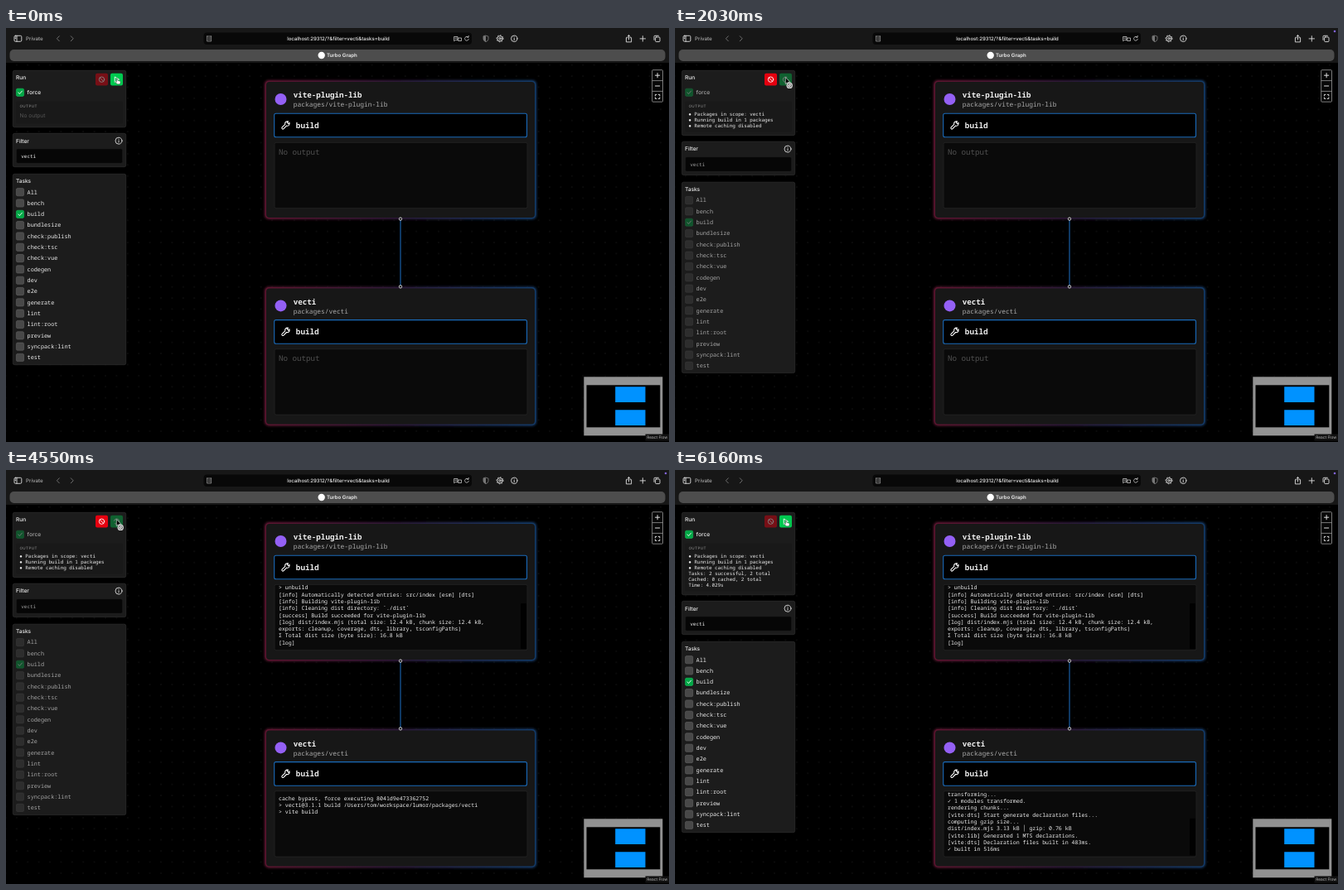
An HTML page for the animation above (6300 ms loop, 800 by 500 pixels).

```html
<!DOCTYPE html>
<html lang="en">
<head>
<meta charset="utf-8">
<title>Turbo Graph</title>
<style>
  html, body { margin: 0; width: 100%; height: 100%; overflow: hidden; background: #000; }
  svg { display: block; width: 800px; height: 500px; }
  text { font-family: Inter, sans-serif; fill: #eee; text-rendering: geometricPrecision; white-space: pre; }
  .mono { font-family: "Noto Sans Mono", "DejaVu Sans Mono", monospace; font-weight: 500; }
  .bold { font-weight: 700; }
  .line { fill: none; stroke: #ddd; stroke-linecap: round; stroke-linejoin: round; }
  .panel { fill: #1c1c1c; stroke: #303030; stroke-width: .7; }
</style>
</head>
<body>
<svg id="stage" viewBox="0 0 800 500" xmlns="http://www.w3.org/2000/svg">
  <defs>
    <pattern id="dots" width="13.4" height="13.4" x="247.3" y="51.3" patternUnits="userSpaceOnUse">
      <circle cx="6.7" cy="6.7" r=".5" fill="#363636"/>
    </pattern>
    <linearGradient id="rim">
      <stop offset="0" stop-color="#5e1530"/>
      <stop offset=".5" stop-color="#2a1936"/>
      <stop offset="1" stop-color="#133c6a"/>
    </linearGradient>
    <filter id="glow" x="-5%" y="-8%" width="110%" height="116%"><feGaussianBlur stdDeviation="1.5"/></filter>
    <clipPath id="view"><rect x="324.5" y="138.8" width="304" height="78.4"/></clipPath>
  </defs>

  <rect width="800" height="500"/>
  <rect y="42" width="800" height="454" fill="url(#dots)"/>

  <!-- browser chrome -->
  <rect width="800" height="42" fill="#171717"/>
  <rect x="238.5" y="5.5" width="323.5" height="14.5" rx="4" fill="#080808"/>
  <rect x="4.5" y="26" width="791" height="14" rx="5" fill="#4d4d4d"/>
  <circle cx="380.7" cy="33" r="4.2" fill="#fff"/>
  <g class="line" stroke-width=".9">
    <rect x="10" y="9.3" width="8.8" height="7" rx="1.4"/><path d="M13 9.3v7M11.2 11h.6M11.2 12.6h.6"/>
    <path d="M64.3 9.8l-2.9 3 2.9 3M78.3 9.8l2.9 3-2.9 3" stroke="#777"/>
    <path d="M242.6 10h5M242.6 10v6h5v-6M244 12h2.4M244 14h2.4" stroke="#aaa" stroke-width=".7"/>
    <path d="M541 10.5h4v4h-2.5l-1.5 1zM546 12h3.5v3.5h-3.5zM542 12.3h2" stroke-width=".7"/>
    <path d="M557.8 11.3a2.4 2.4 0 1 0 .5 2.2M556 10.6l2 .8.2-2" stroke-width=".7"/>
    <path d="M579 9.2l3 1v3.2q0 2-3 3.3q-3-1.3-3-3.3v-3.2z" stroke="#777"/>
    <path d="M579 9.2v7.5q-3-1.3-3-3.3v-3.2z" fill="#777" stroke="none"/>
    <circle cx="596" cy="12.8" r="3.2"/><circle cx="596" cy="12.8" r="1.2"/>
    <circle cx="596" cy="12.8" r="4" stroke-dasharray=".8 2.34"/>
    <circle cx="613.2" cy="12.8" r="3.7"/><path d="M613.2 12.4v2.3M613.2 10.9v.1"/>
    <path d="M750 11.7h-1.6v5.2h6.2v-5.2h-1.6M751.5 14V8.8M749.9 10.3l1.6-1.6 1.6 1.6"/>
    <path d="M768.3 9.7v6.4M765.1 12.9h6.4"/>
    <rect x="783.6" y="11" width="5.4" height="5.6" rx="1"/><path d="M782 14.4v-4.2q0-.9.9-.9h4.4"/>
  </g>
  <circle id="dot" cx="796" cy="4" r="1.3" fill="#8264e0"/>

  <!-- controls -->
  <rect x="779.7" y="50.7" width="12.8" height="38.5" rx="1" fill="#080808" stroke="#999" stroke-width=".8"/>
  <path d="M779.7 63.6h12.8M779.7 76.4h12.8" stroke="#999" stroke-width=".8"/>
  <g class="line" stroke="#fff" stroke-width="1">
    <path d="M783.5 57.2h5.2M786.1 54.6v5.2M783.5 70h5.2"/>
    <path d="M783.4 81.8v-1.4h1.5M787.3 80.4h1.5v1.4M788.8 84v1.4h-1.5M784.9 85.4h-1.5v-1.4"/>
  </g>

  <!-- minimap -->
  <rect x="697.3" y="421.3" width="95" height="71" fill="#929292"/>
  <rect x="700.5" y="431.3" width="88.8" height="51" fill="#000"/>
  <path d="M735.2 433.2h36.3v18.8h-36.3zM735.2 461.2h36.3v18.8h-36.3z" fill="#0092ff"/>
  <rect x="771.5" y="490.5" width="28.5" height="8" fill="#111"/>

  <!-- edge -->
  <path d="M476 231v81" stroke="#195f a6" stroke-width="1.2" style="stroke:#195fa6"/>
  <g id="nodes"></g>
  <g id="side"></g>
</svg>

<script>
const NS = 'http://www.w3.org/2000/svg';
const LOOP = 6300, STEP = 70, CLICK = 840, SCOPE = 1610, DONE = 6090, FADE = 150;
const stage = document.getElementById('stage');
const side = document.getElementById('side');

function el(parent, tag, attrs = {}, text) {
  const e = document.createElementNS(NS, tag);
  for (const k in attrs) e.setAttribute(k, attrs[k]);
  if (text) e.textContent = text;
  parent.appendChild(e);
  return e;
}
// y is the middle of the line
function label(parent, x, y, size, text, attrs = {}) {
  return el(parent, 'text', { x, y: y + size * .34, 'font-size': size, ...attrs }, text);
}
const mono = { class: 'mono' }, bold = { class: 'mono bold' };
const group = parent => el(parent, 'g');
const rect = (parent, x, y, width, height, attrs) => el(parent, 'rect', { x, y, width, height, ...attrs });
const path = (parent, d, attrs) => el(parent, 'path', { d, class: 'line', ...attrs });
const show = (e, on) => e.setAttribute('visibility', on ? 'visible' : 'hidden');
const move = (e, y) => e.setAttribute('transform', `translate(0 ${y})`);

label(stage, 24, 13, 6.2, 'Private', { style: 'fill:#aaa', 'font-weight': 500 });
label(stage, 401, 13, 6.05, 'localhost:29312/?&filter=vecti&tasks=build', { 'text-anchor': 'middle', 'font-weight': 500 });
label(stage, 387, 33, 6.1, 'Turbo Graph', { 'font-weight': 600 });
label(stage, 773.2, 494.5, 4.8, 'React Flow', { style: 'fill:#bbb' });

// Each log entry: [time, lines...]
const libLog = [
  [2450, 'cache bypass, force executing 5ac62673b6de64fb'],
  [2800, '> vite-plugin-lib@3.0.2 build /Users/tom/workspace/lumor/packages/vite-', 'plugin-lib', '> unbuild'],
  [3430, '[info] Automatically detected entries: src/index [esm] [dts]', '[info] Building vite-plugin-lib',
    '[info] Cleaning dist directory: `./dist`'],
  [4060, '[success] Build succeeded for vite-plugin-lib',
    '[log] dist/index.mjs (total size: 12.4 kB, chunk size: 12.4 kB,',
    'exports: cleanup, coverage, dts, library, tsconfigPaths)', 'Σ Total dist size (byte size): 16.8 kB', '[log]']
];
const vectiLog = [
  [4130, 'cache bypass, force executing 8041d9e473362752'],
  [4480, '> vecti@3.1.1 build /Users/tom/workspace/lumor/packages/vecti', '> vite build'],
  [5250, '[vite:lib] Externalized builtin modules.', '[vite:lib] Injected 2 aliases.'],
  [5600, 'vite v7.1.5 building for production...', 'transforming...'],
  [5950, '✓ 1 modules transformed.', 'rendering chunks...', '[vite:dts] Start generate declaration files...'],
  [6020, 'computing gzip size...', 'dist/index.mjs 3.13 kB │ gzip: 0.76 kB',
    '[vite:lib] Generated 1 MTS declarations.', '[vite:dts] Declaration files built in 483ms.', '✓ built in 516ms']
];
const PITCH = 8.3, VIEW = 78;

function makeNode(top, name, log) {
  const g = group(document.getElementById('nodes'));
  move(g, top);
  const rim = { rx: 5, fill: 'url(#rim)' };
  rect(g, 312, 63, 328, 168, { ...rim, filter: 'url(#glow)' });
  rect(g, 312.7, 63.7, 326.6, 166.6, rim);
  rect(g, 314, 65, 324, 164, { rx: 4, fill: '#171717' });
  el(g, 'circle', { cx: 331.5, cy: 86, r: 7, fill: '#9460f5' });
  label(g, 346.8, 81.3, 9.2, name, bold);
  label(g, 346.8, 92.6, 7.9, 'packages/' + name, { ...mono, style: 'fill:#aaa' });
  rect(g, 323.7, 103.2, 304.8, 28.6, { rx: 2, fill: '#000', stroke: '#1a6ab8', 'stroke-width': 1.1 });
  path(g, 'M339.2 114.2l1.5 1.5 1.3-1.3q.5 2-.8 3.2-1.2 1-2.7.5l-3.5 3.6q-.9.8-1.8 0-.8-.9 0-1.8l3.6-3.5q-.5-1.5.5-2.7 1.2-1.3 3.2-.8z',
    { style: 'stroke:#fff', 'stroke-width': 1.1 });
  label(g, 349.8, 117.8, 9.3, 'build', bold);
  rect(g, 324, 138.3, 305, 79.4, { rx: 2, fill: '#0a0a0a', stroke: '#252525', 'stroke-width': .8 });
  const empty = label(g, 329, 149.5, 9.2, 'No output', { ...mono, style: 'fill:#505050' });
  const clip = el(g, 'g', { 'clip-path': 'url(#view)' });
  const body = group(clip);
  const lines = log.flatMap(([at, ...rows]) => rows.map(row => ({ at, row })));
  lines.forEach((l, i) => l.node = label(body, 329, 147.2 + i * PITCH, 6.57, l.row, mono));
  const thumb = rect(clip, 621, 140, 7, 10, { rx: 1, fill: '#010101' });
  return t => {
    const n = lines.filter(l => l.at <= t).length;
    show(empty, !n);
    lines.forEach((l, i) => show(l.node, i < n));
    const full = n * PITCH + 8.4, scroll = Math.max(0, full - VIEW);
    move(body, -scroll);
    show(thumb, scroll > 0);
    thumb.setAttribute('y', 140 + scroll / full * 76);
    thumb.setAttribute('height', Math.min(1, VIEW / full) * 76);
  };
}
const nodes = [makeNode(0, 'vite-plugin-lib', libLog), makeNode(249.4, 'vecti', vectiLog)];
for (const cy of [230.6, 312.4])
  el(stage, 'circle', { cx: 476, cy, r: 1.7, fill: '#111', stroke: '#ddd', 'stroke-width': .9 });

// Parts that dim while a run is active, each with its dimmed opacity
const dims = [];
function dimGroup(parent, low) {
  const g = group(parent);
  dims.push([g, low]);
  return g;
}
function checkbox(parent, y, on) {
  rect(parent, 12.4, y - 4.6, 9.2, 9.2, { rx: 1.6, fill: on ? '#00a846' : '#484848', stroke: on ? '#16c25c' : '#626262', 'stroke-width': .6 });
  if (on) path(parent, `M14.8 ${y + .1}l1.6 1.7 3-3.5`, { style: 'stroke:#fff', 'stroke-width': .9 });
}
const BOX = .4, TEXT = .65;

// Run panel
const white = { style: 'stroke:#fff', 'stroke-width': .9 };
const runBox = rect(side, 8.3, 51.3, 136.4, 68.5, { rx: 2, class: 'panel' });
label(side, 12, 60, 6.6, 'Run', { 'font-weight': 500 });
const stop = group(side);
rect(stop, 108, 54.8, 15, 14.8, { rx: 2, fill: '#e5000f' });
el(stop, 'circle', { cx: 115.5, cy: 62.2, r: 3.2, class: 'line', ...white });
path(stop, 'M113.2 60l4.6 4.5', white);
const start = dimGroup(side, BOX);
rect(start, 126, 54.8, 15, 14.8, { rx: 2, fill: '#00c950' });
const play = path(start, 'M131.6 59.2l5 3-5 3z', white);
const spinner = path(start, 'M136.7 62.2a3.2 3.2 0 1 1-2.2-3', white);
checkbox(dimGroup(side, BOX), 77.8, true);
label(dimGroup(side, TEXT), 25.6, 77.8, 6.65, 'force', { 'font-weight': 500 });
const outBox = rect(side, 12, 88.5, 129, 27, { rx: 2, fill: '#191919' });
label(side, 16.5, 94.2, 4.5, 'OUTPUT', { 'letter-spacing': .4, style: 'fill:#999' });
const none = label(side, 16.5, 106, 6.6, 'No output', { style: 'fill:#555' });
const runLines = ['● Packages in scope: vecti', '● Running build in 1 packages', '● Remote caching disabled',
  'Tasks: 2 successful, 2 total', 'Cached: 0 cached, 2 total', 'Time: 4.029s']
  .map((s, i) => label(side, 16.3, 103.6 + i * 7.06, 5.89, s, mono));

// Filter and task panels slide with the run panel
const lower = group(side);
rect(lower, 8.3, 127.3, 136.4, 40.4, { rx: 2, class: 'panel' });
label(lower, 12, 136.3, 6.6, 'Filter', { 'font-weight': 500 });
el(lower, 'circle', { cx: 136, cy: 136.2, r: 4, class: 'line', 'stroke-width': .9 });
path(lower, 'M136 135.9v2.2M136 134.2v.1', { 'stroke-width': .9 });
rect(lower, 12.3, 145.8, 128.4, 17.6, { rx: 2, fill: '#060606', stroke: '#222', 'stroke-width': .6 });
label(dimGroup(lower, TEXT), 18.2, 154.6, 6, 'vecti', mono);
rect(lower, 8.3, 176.3, 136.4, 230.4, { rx: 2, class: 'panel' });
label(lower, 12, 185, 6.5, 'Tasks', { 'font-weight': 500 });
const boxes = dimGroup(lower, BOX), names = dimGroup(lower, TEXT);
'All bench build bundlesize check:publish check:tsc check:vue codegen dev e2e generate lint lint:root preview syncpack:lint test'
  .split(' ').forEach((name, i) => {
    const y = 198.2 + i * 13.32;
    checkbox(boxes, y, name === 'build');
    label(names, 25.6, y, 6.8, name, mono);
  });

// Pointers
const hand = path(stage, 'M133.4 60.8q.8-.8 1.3.2v2.4l2.6.7q1 .4.8 1.5l-.5 2.2h-3.6l-2.2-3q0-.9.9-.5l.7.6z',
  { style: 'fill:#fff;stroke:#222', 'stroke-width': .4 });
const blocked = group(stage);
path(blocked, 'M133.3 60v7.6l1.8-1.7 1.2 2.6 1.2-.6-1.2-2.5h2.4z', { style: 'fill:#000;stroke:#eee', 'stroke-width': .6 });
el(blocked, 'circle', { cx: 138.2, cy: 69.4, r: 3.7, fill: '#ddd' });
el(blocked, 'circle', { cx: 138.2, cy: 69.4, r: 2.3, class: 'line', style: 'stroke:#666', 'stroke-width': .8 });
path(blocked, 'M136.6 67.8l3.2 3.2', { style: 'stroke:#666', 'stroke-width': .8 });

const dot = document.getElementById('dot');

function draw(t) {
  const busy = t >= CLICK && t < DONE, done = t >= DONE;
  const dim = busy ? Math.min(1, (t - CLICK + STEP) / FADE) : 0;
  dims.forEach(([g, low]) => g.setAttribute('opacity', 1 - dim * (1 - low)));
  stop.setAttribute('opacity', .45 + dim * .55);
  show(play, !busy);
  show(spinner, busy);
  spinner.setAttribute('transform', `rotate(${t * .36} 133.5 62.2)`);
  show(hand, !busy);
  show(blocked, busy);
  show(dot, t >= CLICK);

  const count = done ? 6 : t >= SCOPE ? 3 : 0;
  const grow = [0, 9.9, 31][count / 3];
  show(none, !count);
  runLines.forEach((l, i) => show(l, i < count));
  runBox.setAttribute('height', 68.5 + grow);
  outBox.setAttribute('height', 27 + grow);
  move(lower, grow);
  nodes.forEach(update => update(t));
}

const origin = performance.now();
function tick() {
  const t = (performance.now() - origin) % LOOP;
  draw(Math.floor(t / STEP) * STEP);
  requestAnimationFrame(tick);
}
tick();
</script>
</body>
</html>
```
